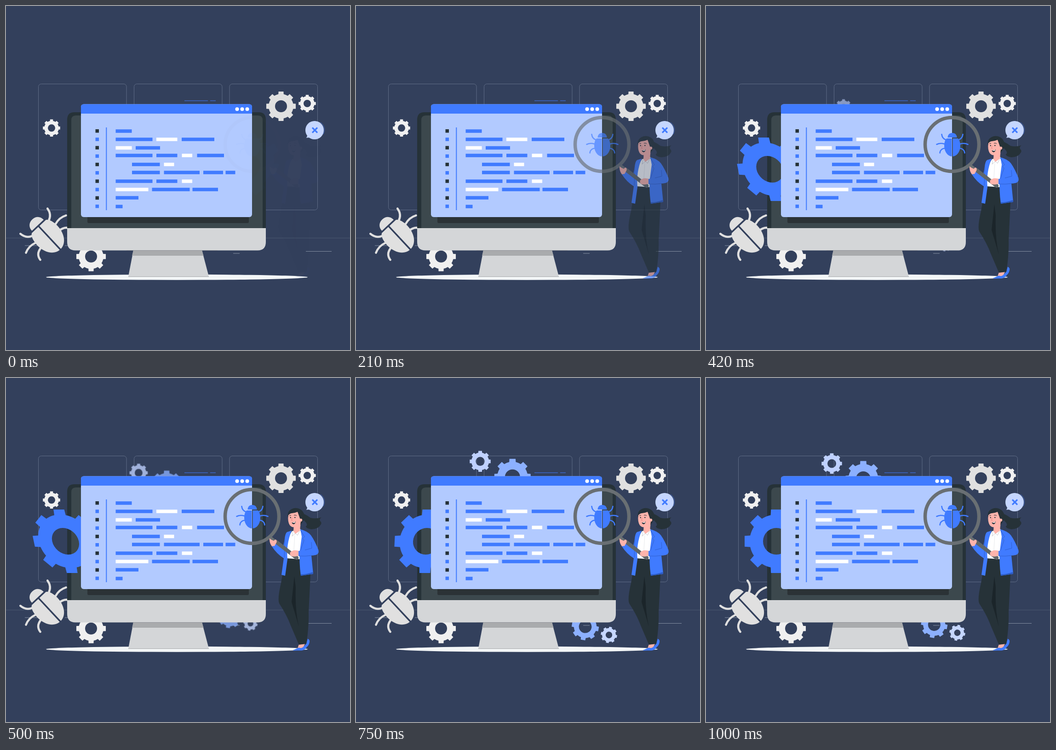
These frames come from a looping animation (748x748 px, 1040 ms). An HTML page:

```html
<!DOCTYPE html>
<html lang="en">
<head>
<meta charset="utf-8">
<title>Bug fixing</title>
<style>
html, body { margin: 0; width: 100%; height: 100%; overflow: hidden; background: #33405c; }
svg { display: block; width: 100%; height: 100%; }
</style>
</head>
<body>
<script>
const LOOP = 1040, STEPS = 25;
const blue = '#407bff', dark = '#263238', skin = '#ffb4ab', grey = '#696f73';

// Eight-toothed gear centred on (x, y) with outer radius R and a round hole.
function gear(x, y, R, hole, fill, turn = 0) {
  const r = R * .83;
  const at = (rad, a) => `${(rad * Math.cos(a)).toFixed(2)},${(rad * Math.sin(a)).toFixed(2)}`;
  let d = '';
  for (let k = 0; k < 8; k++) {
    const a = k * Math.PI / 4;
    d += `${k ? `A${r} ${r} 0 0 1 ` : 'M'}${at(r, a - .215)}L${at(R, a - .168)} ${at(R, a + .168)} ${at(r, a + .215)}`;
  }
  d += `A${r} ${r} 0 0 1 ${at(r, -.215)}ZM${hole},0A${hole} ${hole} 0 1 0 ${-hole},0A${hole} ${hole} 0 1 0 ${hole},0Z`;
  return `<path d="${d}" fill="${fill}" fill-rule="evenodd" transform="translate(${x} ${y}) rotate(${turn})"/>`;
}

function bug(place, color) {
  const side = `<path d="M1-13H12Q17-10 17.5 2C17.5 16 10 25.500 1 26Z"/>
    <path d="M23-22Q22-13 14-10M34 0Q26-4 17-1M27 18.500Q26 9 15 8" fill="none" stroke="${color}" stroke-width="2.600" stroke-linecap="round"/>`;
  return `<g fill="${color}" transform="${place}">
    <path d="M-10-15C-10-21-6-25 0-25S10-21 10-15Z"/>${side}<g transform="scale(-1 1)">${side}</g></g>`;
}

// Each row: baseline centre, then start and end pairs; a negative start marks a white bar.
const rows = [
  [272, 238.5, 273.5],
  [290, 238.5, 318.5, -327, 372.5, 382, 453],
  [308.5, -238.5, 273.5, 282, 335],
  [325, 238.5, 318.5, 327, 372.5, -382.5, 405, 415.5, 474],
  [344.5, 274, 334.5, -343.5, 365.5],
  [362, 274, 334.5, 343.5, 421, 429, 472, 477.5, 498.5],
  [381, 238.5, 318.5, 327, 372.5, -382.5, 405],
  [399, -238.5, 309.5, 317.5, 399.5, 405.5, 461],
  [417, 238.5, 288],
  [436, 238.5, 253.5]
];

function code() {
  return rows.map(([y, ...bars], i) => {
    let s = `<rect x="194.500" y="${268 + i * 18.2}" width="7.500" height="7.500" fill="${i % 2 ? blue : dark}"/>`;
    for (let k = 0; k < bars.length; k += 2) {
      const x = Math.abs(bars[k]);
      s += `<rect x="${x}" y="${y - 3.75}" width="${bars[k + 1] - x}" height="7.500" fill="${bars[k] < 0 ? '#fff' : blue}"/>`;
    }
    return s;
  }).join('');
}

const scenery = `
  <g fill="none" stroke="#5f6c86">
    ${[70.5, 278.5, 486].map(x => `<rect x="${x}" y="169.500" width="191.500" height="274" rx="6"/>`).join('')}
    <path d="M0 504.500H748" stroke="#4a5870"/>
    <path d="M41 521H80M128 521H134M494 538H508M652 533.500H708" stroke="#8490a3"/>
    <path d="M388 206H439M444 206H456" stroke="${blue}"/>
  </g>
  <ellipse cx="371.500" cy="589.700" rx="284.500" ry="6" fill="#f3f6f7"/>
  ${gear(598, 218, 32.5, 13, '#e0e0e0')}
  ${gear(655, 212, 19, 8, '#f0f0f0')}
  ${gear(99, 265.3, 19, 8, '#f0f0f0')}
  ${gear(185, 544.7, 32.5, 13, '#f0f0f0')}
  ${bug('translate(87 496) rotate(-43) scale(1.75)', '#e0e0e0')}`;

const monitor = `
  <path d="M277 531H426L441 588H266Z" fill="#d4d6d8"/>
  <path d="M277 531H426L429.500 543H274Z" fill="#a9abad"/>
  <path d="M266 588.500H441" stroke="#a9abad"/>
  <path d="M133 490V247Q133 231 149 231H549Q565 231 565 247V490Z" fill="${dark}"/>
  <path d="M142 483V248Q142 238 152 238H548Q558 238 558 248V483Z" fill="#3c484d"/>
  <path d="M133 483H565V513Q565 531.500 547 531.500H151Q133 531.500 133 513Z" fill="#d4d6d8"/>
  <path d="M262 531.500H460" stroke="#7d8288" stroke-width=".7"/>
  <path d="M177 458H528V469Q528 472 525 472H180Q177 472 177 469Z" fill="#2b3236"/>`;

const editor = `
  <rect x="163" y="213.500" width="372" height="245.500" rx="6" fill="#b2caff"/>
  <path d="M163 234V219.500Q163 213.500 169 213.500H529Q535 213.500 535 219.500V234Z" fill="${blue}"/>
  ${[502.5, 513.5, 524.5].map(x => `<circle cx="${x}" cy="224.300" r="4" fill="#fff"/>`).join('')}
  <path d="M218.300 264V444" stroke="${blue}" stroke-width="2"/>
  ${code()}`;

const bubble = `
  <path d="M684 253A20 20 0 0 1 690 279" fill="none" stroke="${blue}" stroke-width=".6"/>
  <path d="M655 278Q656 284 652.500 286.500L662 286Z" fill="#c5d6ff"/>
  <circle cx="671" cy="270" r="20" fill="#c5d6ff"/>
  <path d="M666 264.500L677 275.500M677 264.500L666 275.500" stroke="${blue}" stroke-width="3.200"/>`;

const woman = `
  ${bug('translate(535.5 301)', blue)}
  <path d="M637 579L650 578L646 587L634 588Z" fill="${skin}"/>
  <path d="M623.500 592Q633 588 637 586Q641 589 646 585L653 578L656 567Q661 569 660 574Q659 581 654 585Q650 592 643 592.500H625Z" fill="${blue}"/>
  <path d="M607 392L598 446Q590 480 594 490Q611 516 619 538L637 580L653 578Q659 540 658 510L662 428L642 392Z" fill="${dark}"/>
  <path d="M627 431L621 487L637 541Q628 505 630 455Z" fill="#1b252a"/>
  <path d="M645 294Q654 298 662 304Q673 307 686 303Q681 306 683 311Q687 314 685 318Q679 329 664 329Q651 327 652 322Q656 321 653 315Q648 309 643 306Z" fill="${dark}"/>
  <path d="M622 333L640 328L644 345L639 394L610 392Q609 350 622 333Z" fill="#fff"/>
  <path d="M626 318L641 312L639 332L629 339L625 333Z" fill="${skin}"/>
  <path d="M614 298Q612 312 617 320Q622 326 630 324Q639 321 645 308V295L630 287Z" fill="${skin}"/>
  <path d="M613 302Q611 290 621 285Q631 280 641 286Q650 292 648 304Q646 315 640 319Q642 310 639 305Q637 299 634 291Q625 295 617 294Q614 297 613 302Z" fill="${dark}"/>
  <circle cx="641" cy="309" r="3.200" fill="${skin}"/>
  <circle cx="618.700" cy="303.500" r="1.200" fill="${dark}"/><circle cx="628.300" cy="303.200" r="1.200" fill="${dark}"/>
  <path d="M616 299.500L620 298.500M626 298.500Q629 297 632 299.500" fill="none" stroke="${dark}"/>
  <path d="M622.500 304L620.500 309.500L623 310" fill="none" stroke="#e5807c" stroke-width=".9"/>
  <path d="M621.500 314Q626 314.500 630 311.500Q629 318 625.500 318Q622 317.500 621.500 314Z" fill="${dark}"/>
  <path d="M622 314Q626 314.500 629.500 312L628.500 314.500Q625 316 622 314Z" fill="#fff"/>
  <path d="M624 334L622 344L629 338L634 342L640 330" fill="none" stroke="#c2c6cb" stroke-width=".9"/>
  <path d="M628 342L625 388" stroke="#dde0e3" stroke-width=".7"/>
  <path d="M621 332L611 335Q607 338 606 350L603 366L589 356L578 366Q589 383 604 392L599 428L607 430L612 394Q609 362 621 332Z" fill="${blue}"/>
  <path d="M606 350L605 390" stroke="#2c5bc4" stroke-width=".8"/>
  <path d="M640 329Q656 333 663 342Q671 353 679 373Q682 383 672 385L664 386L668 426L641 430Q637 400 639 375L643 345Z" fill="${blue}"/>
  <path d="M640 330L649 345L645 349L648 353L640 376" fill="none" stroke="#2c5bc4" stroke-width=".8"/>
  <path d="M641 430L668 426L667 422Q653 427 641 427Z" fill="#2c5bc4"/>
  <circle cx="535" cy="301" r="58.500" fill="none" stroke="${grey}" stroke-width="7.500"/>
  <path d="M574 346L588 357" stroke="${grey}" stroke-width="6"/>
  <path d="M587 356L632 391" stroke="#5f6669" stroke-width="8.500" stroke-linecap="round"/>
  <path d="M573 351Q572 347 576 351L582 354L586 351Q590 353 588 358L584 365L578 366Q573 359 573 351Z" fill="${skin}"/>
  <path d="M637 376L633 375Q624 373 618 379Q616 384 620 387Q627 390 637 386Z" fill="${skin}"/>
  <path d="M636 376Q652 374 665 370L678 374Q681 383 672 385Q652 388 636 387Z" fill="${blue}"/>
  <path d="M664 357L665 370L650 374M636 387Q652 388 664 386" fill="none" stroke="#2c5bc4" stroke-width=".8"/>`;

document.body.innerHTML = `<svg viewBox="0 0 748 748">
  ${scenery}
  <g id="cogs">
    ${gear(273.5, 186, 22.5, 9.5, '#bfd1ff')}
    ${gear(342, 219, 39, 16, '#8cb0ff')}
    ${gear(496.3, 536.5, 29, 13.5, '#8cb0ff', 10)}
    ${gear(546.5, 554, 17.5, 7, '#c5d6ff', 12)}
  </g>
  ${monitor}
  <g id="wheel">${gear(0, 0, 70, 29, blue)}</g>
  ${editor}${bubble}
  <g id="woman">${woman}</g>
</svg>`;

// cubic-bezier(.36, -.01, .5, 1.38)
function ease(x) {
  if (x <= 0) return 0;
  if (x >= 1) return 1;
  const curve = (a, b, s) => 3 * a * s * (1 - s) ** 2 + 3 * b * s * s * (1 - s) + s ** 3;
  let lo = 0, hi = 1;
  for (let i = 0; i < 24; i++) {
    const mid = (lo + hi) / 2;
    if (curve(.36, .5, mid) < x) lo = mid; else hi = mid;
  }
  return curve(-.01, 1.38, lo);
}

const [cogs, wheel, person] = ['cogs', 'wheel', 'woman'].map(id => document.getElementById(id));
const pose = (el, opacity, transform) => {
  el.setAttribute('opacity', Math.max(0, Math.min(1, opacity)));
  if (transform) el.setAttribute('transform', transform);
};

function draw() {
  // The motion advances in 24 fps steps.
  const t = performance.now() % LOOP;
  const step = Math.min(STEPS - 1, Math.floor((t + 4) / (LOOP / STEPS)));
  const p = (step + 1) / STEPS;

  pose(person, ease(p / .53));

  const zoom = ease(p);
  pose(cogs, zoom, `translate(409 370) scale(${.5 + zoom / 2}) translate(-409 -370)`);

  const slide = ease(p / .6);
  const skew = p <= .6 ? -20 + 30 * slide
    : p <= .8 ? 10 - 12 * ease((p - .6) / .2)
    : -2 + 2 * ease((p - .8) / .2);
  pose(wheel, slide, `translate(${153 + 374 * (1 - slide)} 355) skewX(${skew})`);

  requestAnimationFrame(draw);
}
draw();
</script>
</body>
</html>
```
